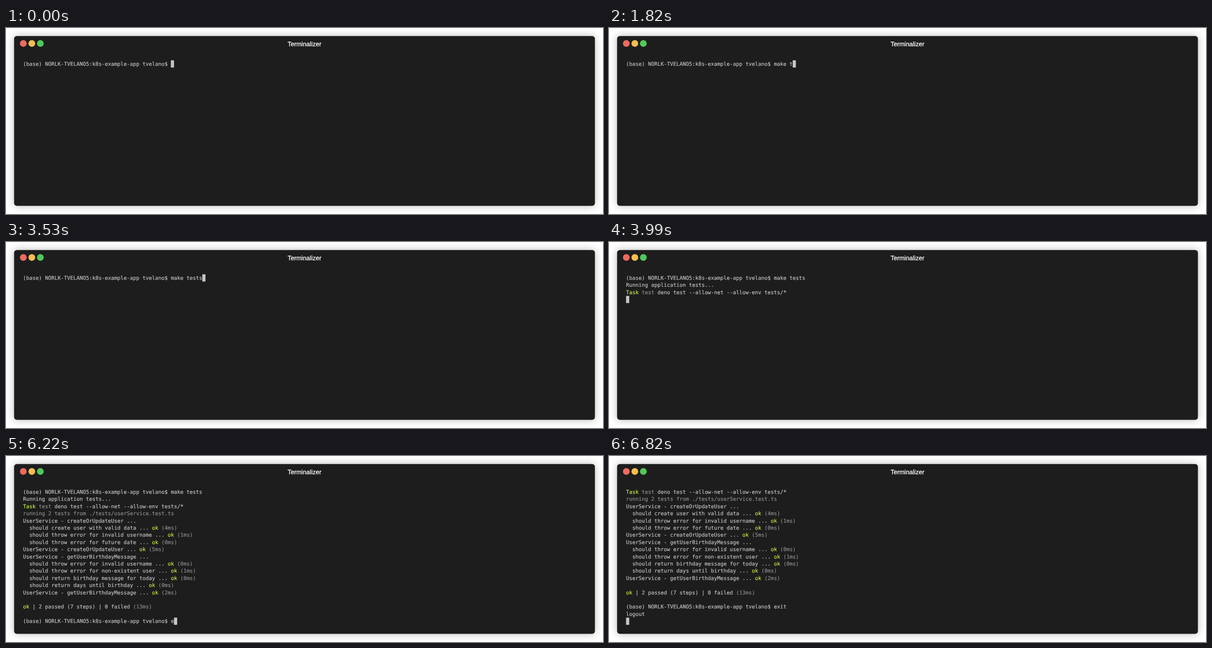
An HTML page for the animation above (8.08 s loop, 1280 px wide and 399 px high).

```html
<!DOCTYPE html>
<html lang="en">
<head>
<meta charset="utf-8">
<title>Terminal</title>
<style>
  html, body { margin: 0; width: 100%; height: 100%; overflow: hidden; background: #fff; }
  .stage {
    position: absolute; left: 0; top: 0; width: 1329px; height: 414px;
    transform: scale(calc(1280 / 1329)); transform-origin: 0 0;
  }
  .window {
    position: absolute; left: 18px; top: 18px; width: 1293px; height: 378px;
    border-radius: 6px; background: #1d1d1d; box-shadow: 0 0 18px rgba(0, 0, 0, .27);
  }
  .dot { position: absolute; top: 9px; width: 15px; height: 15px; border-radius: 50%; }
  .red { left: 13px; background: #ee6a5f; }
  .yellow { left: 32px; background: #f5be4f; }
  .green { left: 51px; background: #4fc95a; }
  .title {
    position: absolute; left: 0; right: 0; top: 8px; text-align: center;
    font: 14px/19px "Liberation Sans", Arial, sans-serif; color: #fff;
    -webkit-text-stroke: .35px; text-rendering: geometricPrecision;
  }
  #screen {
    position: absolute; left: 20px; top: 54px; margin: 0; color: #c4c4c4;
    font: 11.63px/16px "DejaVu Sans Mono", monospace;
    -webkit-text-stroke: .2px; text-rendering: geometricPrecision;
  }
  #screen b { font-weight: normal; color: #c5f046; }
  #screen i { font-style: normal; color: #8e8e8e; }
  .cursor { display: inline-block; height: 16px; vertical-align: top; background: #c7c7c7; }
</style>
</head>
<body>
<div class="stage">
  <div class="window">
    <div class="dot red"></div>
    <div class="dot yellow"></div>
    <div class="dot green"></div>
    <div class="title">Terminalizer</div>
    <pre id="screen"></pre>
  </div>
</div>
<script>
const LOOP = 8080;
const ROWS = 19;
const PROMPT = "(base) NORLK-TVELANO5:k8s-example-app tvelano$ ";
const screen = document.getElementById("screen");

const ok = (label, ms) => `${label} ... <b>ok</b> <i>(${ms}ms)</i>\n`;
const step = (label, ms) => ok("  should " + label, ms);

const results =
  step("create user with valid data", 4) +
  step("throw error for invalid username", 1) +
  step("throw error for future date", 0) +
  ok("UserService - createOrUpdateUser", 5) +
  "UserService - getUserBirthdayMessage ...\n" +
  step("throw error for invalid username", 0) +
  step("throw error for non-existent user", 1) +
  step("return birthday message for today", 0) +
  step("return days until birthday", 0) +
  ok("UserService - getUserBirthdayMessage", 2) +
  "\n<b>ok</b> | 2 passed (7 steps) | 0 failed <i>(13ms)</i>\n\n";

// Terminal output as [time in ms, appended text]
const output = [
  [0, PROMPT],
  [1040, "m"], [1140, "a"], [1250, "k"], [1350, "e"], [1490, " "],
  [1820, "t"], [1880, "e"], [2050, "s"], [2130, "t"], [3530, "s"],
  [3900, "\nRunning application tests...\n"],
  [3990, "<b>Task</b> <i>test</i> deno test --allow-net --allow-env tests/*\n"],
  [4120, "<i>running 2 tests from ./tests/userService.test.ts</i>\n" +
         "UserService - createOrUpdateUser ...\n"],
  [4170, results],
  [4220, PROMPT],
  [6220, "e"], [6420, "x"], [6500, "i"], [6740, "t"],
  [6820, "\nlogout\n"]
];

let shown = 0;
function draw(now) {
  const t = now % LOOP;
  const count = output.filter(([at]) => at <= t).length;
  if (count !== shown) {
    shown = count;
    const text = output.slice(0, count).map(([, part]) => part).join("");
    const visible = text.split("\n").slice(-ROWS).join("\n");
    screen.innerHTML = visible + '<span class="cursor"> </span>';
  }
}

const start = performance.now();
function tick() {
  draw(performance.now() - start);
  requestAnimationFrame(tick);
}
tick();
</script>
</body>
</html>
```
